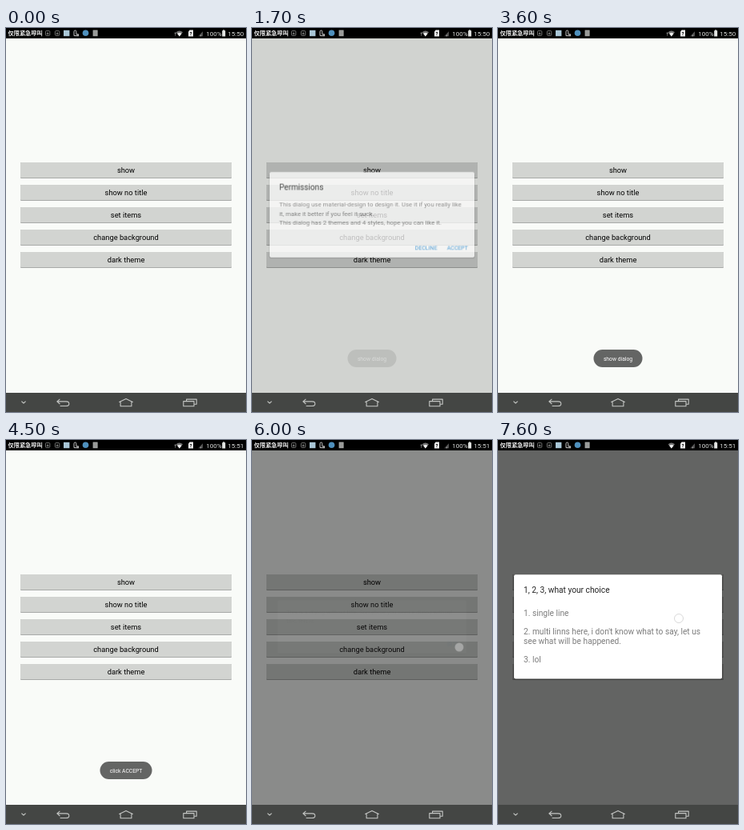
Animation of 300x480 px, one loop 8000 ms. Source, as an HTML page:

```html
<!DOCTYPE html>
<html lang="en">
<head>
<meta charset="utf-8">
<title>Dialog demo</title>
<style>
html, body { margin: 0; width: 100%; height: 100%; overflow: hidden; background: #f9fbf8; }
svg { display: block; width: 100vw; height: 100vh; font-family: Roboto, "Noto Sans CJK SC", "Noto Sans CJK", sans-serif; }
.mid { text-anchor: middle; }
.end { text-anchor: end; }
.cjk { font-family: "Noto Sans CJK SC", "Noto Sans CJK", sans-serif; }
.label { font-size: 9.3px; }
.heading { font-size: 10.2px; fill: #222; }
.body { font-size: 7.95px; fill: #777; }
.item { font-size: 10.2px; fill: #7c7c7c; }
.action { font-size: 7.1px; fill: #2d91d8; }
.toast rect { fill: rgba(74, 75, 74, .85); }
.toast text { font-size: 6.75px; fill: #fff; }
.line { fill: none; stroke: #c4c6c4; stroke-width: 1.1; stroke-linejoin: round; }
.dialog { transform-origin: 150px 233.5px; }

/* Every part holds its pose until the next 100 ms step (1.25 %). */
.anim { animation: 8s step-end infinite; }
#dim { animation-name: dim; }
#permissions { animation-name: permissions; }
#untitled { animation-name: untitled; }
#choices { animation-name: choices; }
#toastShow { animation-name: toastShow; }
#toastAccept { animation-name: toastAccept; }
#pressShow { animation-name: pressShow; }
#pressUntitled { animation-name: pressUntitled; }
#pressItems { animation-name: pressItems; }
#touch { animation-name: touch; }
#clockBefore { animation-name: clockBefore; }
#clockAfter { animation-name: clockAfter; }
#traffic { animation-name: traffic; }

@keyframes dim {
  0%, 45%, 78.75% { opacity: 0; }
  21.25%, 57.5%, 92.5% { opacity: .16; }
  22.5%, 58.75%, 93.75% { opacity: .4; }
  23.75%, 60%, 95% { opacity: .6; }
  41.25%, 75% { opacity: .446; }
  42.5%, 76.25% { opacity: .25; }
  43.75%, 77.5% { opacity: .08; }
}
@keyframes permissions {
  0%, 42.5% { opacity: 0; transform: scale(.9); }
  21.25% { opacity: .75; transform: scale(.985); }
  22.5% { opacity: 1; transform: none; }
  40% { opacity: .5; transform: scale(.95); }
  41.25% { opacity: .03; transform: scale(.907); }
}
@keyframes untitled {
  0%, 76.25% { opacity: 0; transform: scale(.9); }
  57.5% { opacity: .75; transform: scale(.985); }
  58.75% { opacity: 1; transform: none; }
  73.75% { opacity: .5; transform: scale(.95); }
  75% { opacity: .03; transform: scale(.907); }
}
@keyframes choices {
  0% { opacity: 0; transform: scale(.9); }
  92.5% { opacity: .75; transform: scale(.985); }
  93.75% { opacity: 1; transform: none; }
}
@keyframes toastShow {
  0%, 48.75% { opacity: 0; }
  21.25% { opacity: .17; }
  22.5% { opacity: .5; }
  23.75% { opacity: .8; }
  25% { opacity: 1; }
  46.25% { opacity: .6; }
  47.5% { opacity: .25; }
}
@keyframes toastAccept {
  0%, 71.25% { opacity: 0; }
  48.75%, 70% { opacity: .3; }
  50%, 68.75% { opacity: .7; }
  51.25% { opacity: 1; }
}
@keyframes pressShow { 0%, 20% { opacity: 0; } 13.75% { opacity: .11; } }
@keyframes pressUntitled { 0%, 56.25% { opacity: 0; } 51.25% { opacity: .11; } }
@keyframes pressItems { 0%, 92.5% { opacity: 0; } 86.25% { opacity: .11; } }
@keyframes touch {
  0%, 20% { opacity: 0; transform: translate(213px, 173px); }
  1.25% { opacity: .5; transform: translate(213px, 173px); }
  2.5% { opacity: 1; transform: translate(213px, 173px); }
  33.75% { opacity: .5; transform: translate(257px, 275px); }
  35% { opacity: 1; transform: translate(257px, 275px); }
  41.25% { opacity: 0; transform: translate(257px, 275px); }
  51.25% { opacity: 1; transform: translate(237px, 206px); }
  56.25% { opacity: 0; transform: translate(237px, 206px); }
  68.75% { opacity: 1; transform: translate(259px, 259px); }
  75% { opacity: .65; transform: translate(259px, 259px); }
  76.25% { opacity: 0; transform: translate(259px, 259px); }
  82.5% { opacity: .5; transform: translate(237px, 233px); }
  83.75% { opacity: 1; transform: translate(237px, 233px); }
  92.5% { opacity: 1; transform: translate(232px, 228px); }
  93.75% { opacity: 1; transform: translate(228px, 225px); }
  95% { opacity: 1; transform: translate(226px, 223px); }
}
@keyframes clockBefore { 0% { opacity: 1; } 50% { opacity: 0; } }
@keyframes clockAfter { 0% { opacity: 0; } 50% { opacity: 1; } }
@keyframes traffic { 0% { opacity: 1; } 92.5% { opacity: 0; } }
</style>
</head>
<body>
<svg viewBox="0 0 300 480" preserveAspectRatio="none">
  <defs>
    <g id="button">
      <rect x="18" width="264" height="20" rx="1" fill="#a8aaa8"/>
      <rect x="18" width="264" height="19" rx="1" fill="#d2d4d1"/>
    </g>
    <rect id="press" x="18" width="264" height="19.5" rx="1"/>
  </defs>

  <rect width="300" height="480" fill="#f9fbf8"/>
  <use href="#button" y="168"/>
  <use href="#button" y="196"/>
  <use href="#button" y="224"/>
  <use href="#button" y="252"/>
  <use href="#button" y="280"/>
  <use href="#press" id="pressShow" class="anim" y="168"/>
  <use href="#press" id="pressUntitled" class="anim" y="196"/>
  <use href="#press" id="pressItems" class="anim" y="224"/>
  <g class="label mid">
    <text x="150" y="181">show</text>
    <text x="150" y="209">show no title</text>
    <text x="150" y="237">set items</text>
    <text x="150" y="265">change background</text>
    <text x="150" y="293">dark theme</text>
  </g>

  <rect id="dim" class="anim" width="300" height="480"/>

  <g id="permissions" class="dialog anim">
    <rect x="19.5" y="180" width="261" height="109" rx="2.5" opacity=".2"/>
    <rect x="20" y="179.2" width="260" height="108.6" rx="2" fill="#fff"/>
    <text class="heading" x="32.2" y="202">Permissions</text>
    <g class="body">
      <text x="32.2" y="223.3">This dialog use material-design to design it. Use it if you really like</text>
      <text x="32.2" y="234.9">it, make it better if you feel it suck.</text>
      <text x="32.2" y="246.5">This dialog has 2 themes and 4 styles, hope you can like it.</text>
    </g>
    <g class="action end">
      <text x="232.7" y="278.2">DECLINE</text>
      <text x="271.8" y="278.2">ACCEPT</text>
    </g>
  </g>

  <g id="untitled" class="dialog anim">
    <rect x="19.5" y="198" width="261" height="73.2" rx="2.5" opacity=".2"/>
    <rect x="20" y="197.2" width="260" height="72.8" rx="2" fill="#fff"/>
    <g class="body">
      <text x="32" y="216">This is a dialog without title. Sometime you need a dialog without</text>
      <text x="32" y="228">title, this is.</text>
    </g>
    <text class="action cjk end" x="268" y="260.3" style="font-size:7.5px">确定</text>
  </g>

  <g id="choices" class="dialog anim">
    <rect x="19.5" y="169" width="261" height="130.5" rx="2.5" opacity=".2"/>
    <rect x="20" y="168.2" width="260" height="130.2" rx="2" fill="#fff"/>
    <text class="heading" x="32" y="191">1, 2, 3, what your choice</text>
    <g class="item">
      <text x="32" y="220">1. single line</text>
      <text x="32" y="243.4">2. multi linns here, i don't know what to say, let us</text>
      <text x="32" y="255.4">see what will be happened.</text>
      <text x="32" y="278.2">3. lol</text>
    </g>
  </g>

  <g id="toastShow" class="toast mid anim">
    <rect x="119.5" y="402" width="61" height="22" rx="11"/>
    <text x="150" y="415.6">show dialog</text>
  </g>
  <g id="toastAccept" class="toast mid anim">
    <rect x="117.5" y="402" width="65" height="22" rx="11"/>
    <text x="150" y="415.6">click ACCEPT</text>
  </g>

  <!-- status bar -->
  <rect width="300" height="13" fill="#000"/>
  <text class="cjk" x="2.5" y="9" font-size="7.2" font-weight="700" fill="#eee">仅限紧急呼叫</text>
  <g fill="none" stroke="#8d8f8d" stroke-width=".8">
    <rect x="49.4" y="3.6" width="5.4" height="5.8" rx="1"/>
    <rect x="61.4" y="3.6" width="5.4" height="5.8" rx="1"/>
    <path d="M51 7.6l1.1-2 1.1 2zM63 7.6l1.1-2 1.1 2z"/>
  </g>
  <rect x="72" y="2.8" width="7.4" height="7.4" fill="#a9c6d6"/>
  <path d="M85 9.6V4.6q0-1.6 1.4-1.6t1.4 1.6v3l2.6 2.2zM88.5 7.8h2v2" fill="none" stroke="#ddd" stroke-width=".9"/>
  <circle cx="99.5" cy="6.3" r="3.8" fill="#4f90bd"/>
  <rect x="108.6" y="2.6" width="6" height="7.6" fill="#a5a7a5"/>
  <path d="M109.6 4.6h4M109.6 6.4h4M109.6 8.2h4" stroke="#777" stroke-width=".5"/>
  <path id="traffic" class="anim" d="M211.7 9.7V5.8M210.8 7l.9-1.3.9 1.3" fill="none" stroke="#aaa" stroke-width=".7"/>
  <path d="M212.6 5.2q4.2-3.6 8.4 0L216.8 10.4z" fill="#777"/>
  <path d="M214.1 7q2.7-2 5.4 0L216.8 10.4z" fill="#eee"/>
  <path d="M228 4.4l1.6-1.8h4.4v7.8h-6z" fill="#eee"/>
  <text class="mid" x="231.1" y="9" font-size="6" font-weight="700">?</text>
  <path d="M240.4 10.2h5.6V4.2z" fill="#555"/>
  <path d="M242.6 10.2l1.4-1.6v1.6z" fill="#ccc"/>
  <g font-size="8" fill="#dcdedc">
    <text x="250.2" y="9.6">100%</text>
    <text id="clockBefore" class="end anim" x="297.2" y="9.6">15:50</text>
    <text id="clockAfter" class="end anim" x="297.2" y="9.6">15:51</text>
  </g>
  <path d="M270.2 3.2h1.2v-1h1.6v1h1.2v7.2h-4z" fill="#e4e6e4"/>

  <!-- navigation bar -->
  <rect y="456" width="300" height="24" fill="#444644"/>
  <g class="line">
    <path d="M19.4 466.7l2.6 2.3 2.6-2.3"/>
    <path d="M67.4 463.8l-3.6 3.1 3.6 3.1M64 466.9h11.2q3.6 0 3.6 2.8t-3.6 2.8h-7.6"/>
    <path d="M141.7 467.4l8.3-4 8.3 4h-1.4v5.3h-13.8v-5.3z"/>
    <path d="M225.6 466.5v-2.4h12.6v6.2h-2.8M221.8 466.6h13.2v6.2h-13.2z"/>
  </g>

  <g id="touch" class="anim">
    <circle r="5.5" fill="#fff" fill-opacity=".52" stroke="#888" stroke-opacity=".4" stroke-width=".8"/>
  </g>
</svg>
</body>
</html>
```
